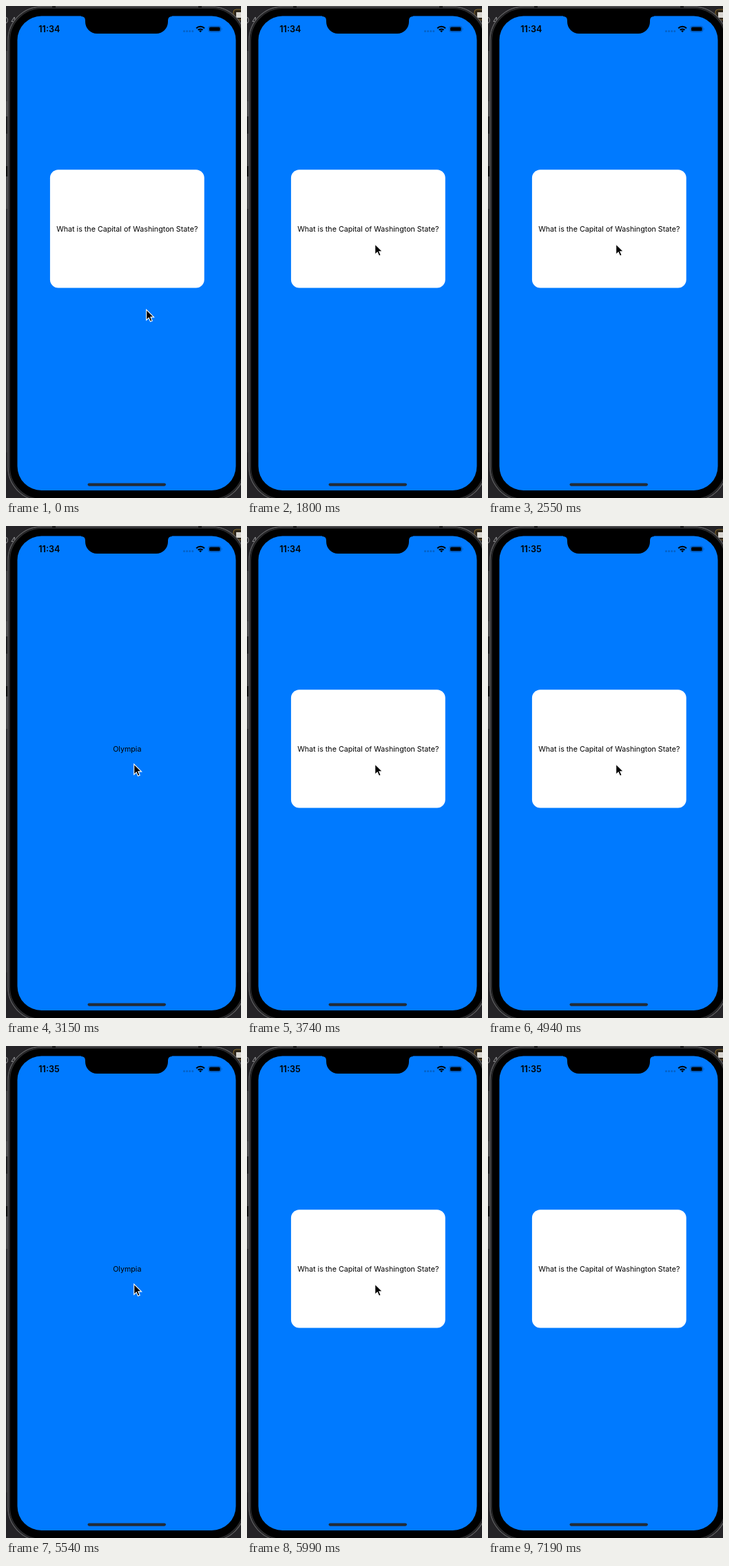
An HTML page for the animation above (7470 ms loop, 341 by 713 pixels).

```html
<!DOCTYPE html>
<html lang="en">
<head>
<meta charset="utf-8">
<title>Flashcard</title>
<style>
html, body { margin: 0; width: 100%; height: 100%; overflow: hidden; background: #242326; }
svg { display: block; width: 341px; height: 713px; }
text { font-family: Inter, Roboto, sans-serif; }
.label { font-size: 10.7px; text-anchor: middle; }
.clock { font-size: 12.6px; font-weight: 600; }
</style>
</head>
<body>
<svg viewBox="0 0 341 713">
  <!-- desktop behind the phone -->
  <rect width="341" height="713" fill="#242326"/>
  <rect y="65" width="4" height="73" fill="#39393b"/>
  <rect y="138" width="4" height="22" fill="#48484a"/>
  <rect y="160" width="4" height="25" fill="#1b1b1d"/>
  <rect y="185" width="4" height="47" fill="#38383a"/>
  <rect y="232" width="4" height="15" fill="#0c0c0d"/>
  <rect y="247" width="4" height="47" fill="#434345"/>
  <rect y="294" width="4" height="353" fill="#2d2d2f"/>
  <text x="-4" y="25" font-size="12" fill="#8d8d8f">0 4</text>
  <rect x="330" y="5" width="18" height="15" rx="4" fill="#2b2418" stroke="#8a6b2c"/>
  <rect x="334" y="9" width="9" height="8" fill="#d8d5d0"/>

  <!-- phone -->
  <rect x="3" y="1" width="344" height="716" rx="49" fill="#000" stroke="#5f5f61" stroke-width="1.4"/>
  <rect x="5" y="3" width="340" height="712" rx="47" fill="none" stroke="#29292b" stroke-width="2"/>
  <path d="M67 1.5h5M279 1.5h5" stroke="#1a1a1b" stroke-width="3"/>
  <rect x="16.5" y="14.5" width="317" height="687.5" rx="35" fill="#007aff"/>
  <path d="M109 14h132v1q-6 0-6 6v2a17 17 0 0 1-17 17h-86a17 17 0 0 1-17-17v-2q0-6-6-6z"/>
  <rect x="118.5" y="691.5" width="113.5" height="4.2" rx="2.1" fill="#222c38"/>

  <!-- status bar -->
  <text class="clock" id="before" x="47.3" y="37.6">11:34</text>
  <text class="clock" id="after" x="47.3" y="37.6">11:35</text>
  <path d="M258.5 36.5h13" stroke="#0561c6" stroke-width="3" stroke-linecap="round" stroke-dasharray="0 4.1"/>
  <g fill="none" stroke="#000" stroke-width="2">
    <path d="M276.2 32.2a8.3 8.3 0 0 1 11.8 0"/>
    <path d="M278.7 34.8a4.8 4.8 0 0 1 6.8 0"/>
  </g>
  <path d="M282.1 38.2l-2-2.1a2.9 2.9 0 0 1 4 0z"/>
  <rect x="293.8" y="29.3" width="18" height="8.2" rx="2.6" fill="none" stroke="#0453ac" stroke-width=".9"/>
  <rect x="295" y="30.5" width="15.6" height="5.8" rx="1.5"/>
  <path d="M312.9 31.8q1.5 1.6 0 3.2z" fill="#0453ac"/>

  <!-- card -->
  <g id="question">
    <rect x="63.9" y="237.3" width="223.8" height="171.2" rx="12" fill="#fff"/>
    <text class="label" x="175.8" y="327.2">What is the Capital of Washington State?</text>
  </g>
  <text class="label" id="answer" x="175.8" y="327.2">Olympia</text>

  <path id="cursor" d="M.7 1v15.2l3.5-3.3 2.3 5.4 2.7-1.1-2.3-5.3h4.7z" stroke="#fff" stroke-width="1.1"/>
</svg>
<script>
const LOOP = 7470;
const $ = id => document.getElementById(id);

// Each step is [time, style]; the style holds until the next step.
function play(id, steps) {
  const frames = steps.map(([time, style]) => ({ ...style, offset: time / LOOP, easing: 'steps(1, end)' }));
  frames.push({ ...steps.at(-1)[1], offset: 1 });
  $(id).animate(frames, { duration: LOOP, iterations: Infinity }).startTime = start;
}

const start = document.timeline.currentTime ?? 0;
const show = on => ({ opacity: on ? 1 : 0 });
const at = (x, y) => ({ transform: `translate(${x}px, ${y}px)`, opacity: 1 });

const flips = [0, 2100, 2550, 3150, 3740, 4340, 4940, 5540, 5990];
play('question', flips.map((time, i) => [time, show(i % 2 === 0)]));
play('answer', flips.map((time, i) => [time, show(i % 2 === 1)]));

play('before', [[0, show(true)], [4340, show(false)]]);
play('after', [[0, show(false)], [4340, show(true)]]);

play('cursor', [
  [0, at(203, 439)],
  [900, at(192.3, 415)],
  [1050, at(186.2, 374)],
  [1650, at(185.4, 372)],
  [1800, at(185, 344)],
  [6290, at(185, 344.5)],
  [6440, at(287.5, 581)],
  [6590, at(298.5, 615)],
  [6740, { ...at(298.5, 615), opacity: 0 }],
]);
</script>
</body>
</html>
```
